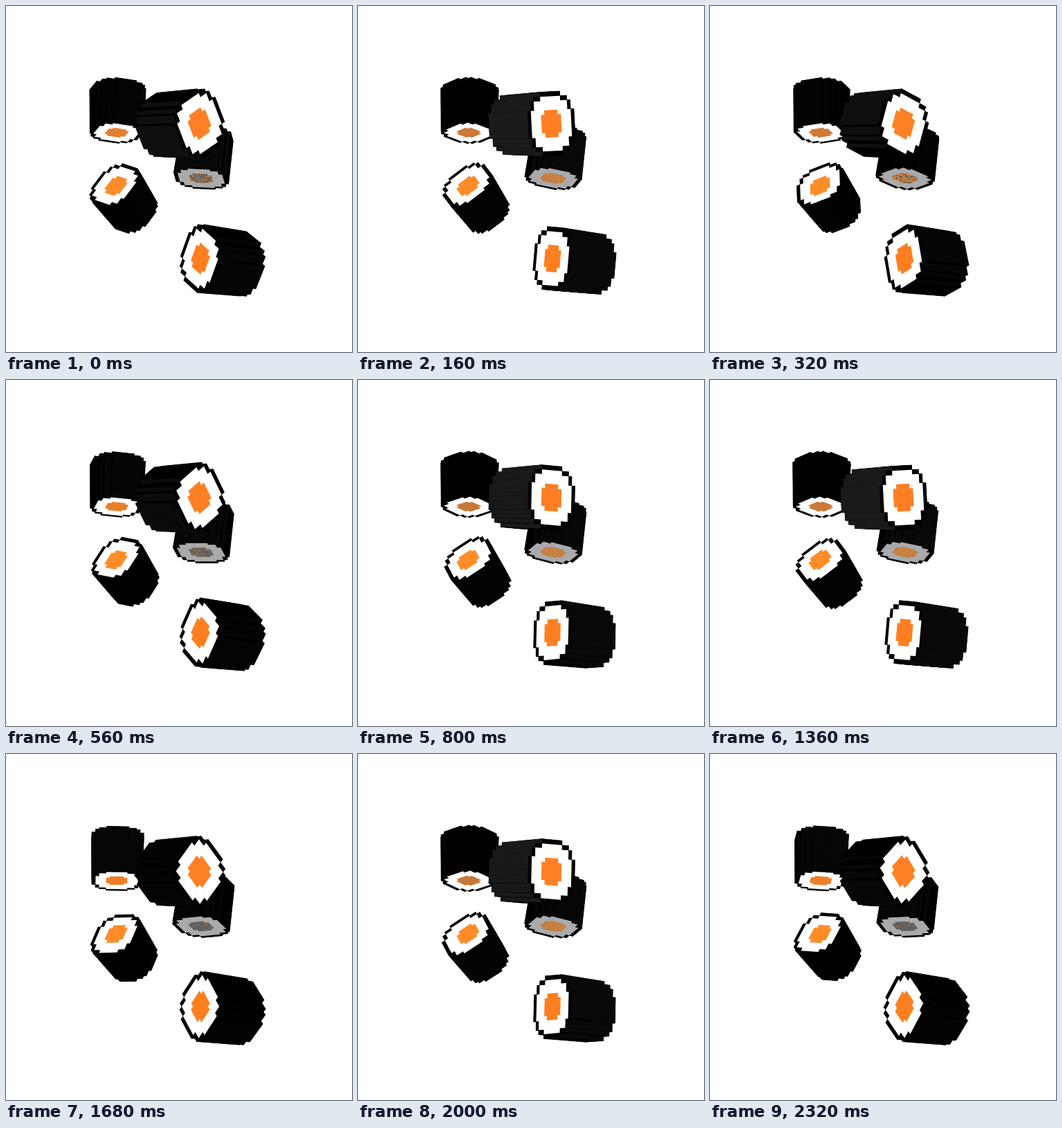
Recreate the animation shown at these times as an HTML page with a canvas. Size 500 by 500 pixels, loop 2.4 s.

```html
<!DOCTYPE html>
<html lang="en">
<head>
<meta charset="utf-8">
<title>Rolling maki</title>
<style>
  html, body { margin: 0; width: 100%; height: 100%; overflow: hidden; background: #fff; }
  canvas { display: block; width: 500px; height: 500px; }
</style>
</head>
<body>
<canvas id="stage" width="500" height="500"></canvas>
<script>
const ctx = document.getElementById('stage').getContext('2d');
const LOOP = 2400, STEP = 80, QUARTER = LOOP / 4;
const RAD = Math.PI / 180;

// Outline of a blocky disc; half holds its half width in cells, row by row from the middle.
function disc(half) {
  const n = half.length, right = [], left = [];
  for (let y = -n; y < n; y++) {
    const w = half[y < 0 ? -y - 1 : y];
    right.push([w, y], [w, y + 1]);
    left.push([-w, y], [-w, y + 1]);
  }
  return right.concat(left.reverse());
}

const NORI = disc([7, 7, 7, 6, 6, 5, 3]);
const RICE = disc([6, 6, 6, 5, 5, 3]);
const FISH = disc([3, 3, 2]);

// near / far: centre x, y and cell size along both ellipse axes.
// side: direction of the visible wall, zero: time when the cells stand upright.
const rolls = [
  { near: [160, 183, 5.1, 2.05], far: [161.5, 120, 5.35, 2.2], tilt: 1, side: -90,
    zero: 480, dir: 1, shine: 6, rice: '#fff',
    fish: t => mix([198, 120, 56], [238, 127, 40], wave(t, 520)) },
  { near: [282, 249, 5.45, 2.15], far: [290.5, 187, 5.2, 2.15], tilt: 6, side: -90,
    zero: 60, dir: 1, shine: 10, rice: '#aaa', speckled: true,
    fish: () => '#606060' },
  { near: [279.5, 170, 4.8, 6.6], far: [220.5, 171.5, 4.45, 6.05], tilt: -3, side: 180,
    zero: 760, dir: 1, shine: 26, rice: '#fff', fish: () => '#ff8024' },
  { near: [159, 260, 5.35, 3.42], far: [188, 301, 4.7, 3.05], tilt: -37, side: 90,
    zero: 760, dir: 1, shine: 3, rice: '#fff', shift: 0.4, fish: () => '#ff8c28' },
  { near: [281, 365, 3.82, 6.5], far: [343, 372.5, 4.1, 6.15], tilt: 5, side: 0,
    zero: 760, dir: -1, shine: 9, rice: '#fff', fish: () => '#ff7f20' }
];

function wave(t, peak) {
  return 0.5 + 0.5 * Math.cos((t - peak) / QUARTER * 2 * Math.PI);
}

function mix(a, b, k) {
  return `rgb(${a.map((v, i) => Math.round(v + (b[i] - v) * k))})`;
}

function random(seed) {
  return () => {
    seed = (seed * 1664525 + 1013904223) >>> 0;
    return seed / 4294967296;
  };
}

function turn([x, y], a) {
  const c = Math.cos(a), s = Math.sin(a);
  return [x * c - y * s, x * s + y * c];
}

function place(shape, [cx, cy, kx, ky], angle, tilt, shift = 0) {
  return shape.map(([x, y]) => {
    const [u, v] = turn([x + shift, y], angle);
    const [px, py] = turn([u * kx, v * ky], tilt);
    return [cx + px, cy + py];
  });
}

function trace(points) {
  ctx.beginPath();
  points.forEach(([x, y]) => ctx.lineTo(x, y));
  ctx.closePath();
}

function fill(points, color, seal) {
  trace(points);
  ctx.fillStyle = color;
  ctx.fill();
  if (seal) {
    ctx.strokeStyle = color;
    ctx.lineWidth = 0.4;
    ctx.stroke();
  }
}

function drawWall(roll, near, far, angle) {
  const side = roll.side * RAD, lit = [];
  NORI.forEach(([x, y], i) => {
    const j = (i + 1) % NORI.length;
    const dx = NORI[j][0] - x, dy = NORI[j][1] - y;
    if (!dx && !dy) return;
    const quad = [near[i], near[j], far[j], far[i]];
    fill(quad, '#000', true);
    const facing = Math.cos(Math.atan2(-dx, dy) + angle - side);
    if (facing <= 0) return;
    const mid = turn([x + dx / 2, y + dy / 2], angle - side);
    lit.push({ quad, depth: mid[0], tone: Math.round(roll.shine * facing ** 6) });
  });
  lit.sort((a, b) => a.depth - b.depth);
  lit.forEach(({ quad, tone }) => fill(quad, `rgb(${tone},${tone},${tone})`));
}

// Flickering orange grains on the shaded filling.
function speckle(points, [cx, cy], t) {
  const share = 0.03 + 0.97 * wave(t, 200);
  const rnd = random(t + 7);
  ctx.save();
  trace(points);
  ctx.clip();
  if (share > 0.9) {
    ctx.fillStyle = '#c88040';
    ctx.fillRect(cx - 24, cy - 14, 48, 28);
  } else {
    ctx.fillStyle = '#e8842e';
    for (let y = -12; y < 12; y++) {
      for (let x = -22; x < 22; x++) {
        if (rnd() < share * 0.8) ctx.fillRect(cx + x, cy + y, 1, 1);
      }
    }
  }
  ctx.restore();
}

function drawRoll(roll, t) {
  const angle = roll.dir * (t - roll.zero) / LOOP * 2 * Math.PI;
  const tilt = roll.tilt * RAD;
  const near = place(NORI, roll.near, angle, tilt, roll.shift);
  const far = place(NORI, roll.far, angle, tilt, roll.shift);
  const fish = place(FISH, roll.near, angle, tilt);
  fill(far, '#000');
  drawWall(roll, near, far, angle);
  fill(near, '#000');
  fill(place(RICE, roll.near, angle, tilt, roll.shift), roll.rice);
  fill(fish, roll.fish(t));
  if (roll.speckled) speckle(fish, roll.near, t);
}

function draw(t) {
  ctx.fillStyle = '#fff';
  ctx.fillRect(0, 0, 500, 500);
  rolls.forEach(roll => drawRoll(roll, t));
}

const start = performance.now();
function tick() {
  const t = (performance.now() - start) % LOOP;
  draw(Math.floor(t / STEP) * STEP);
  requestAnimationFrame(tick);
}
tick();
</script>
</body>
</html>
```
